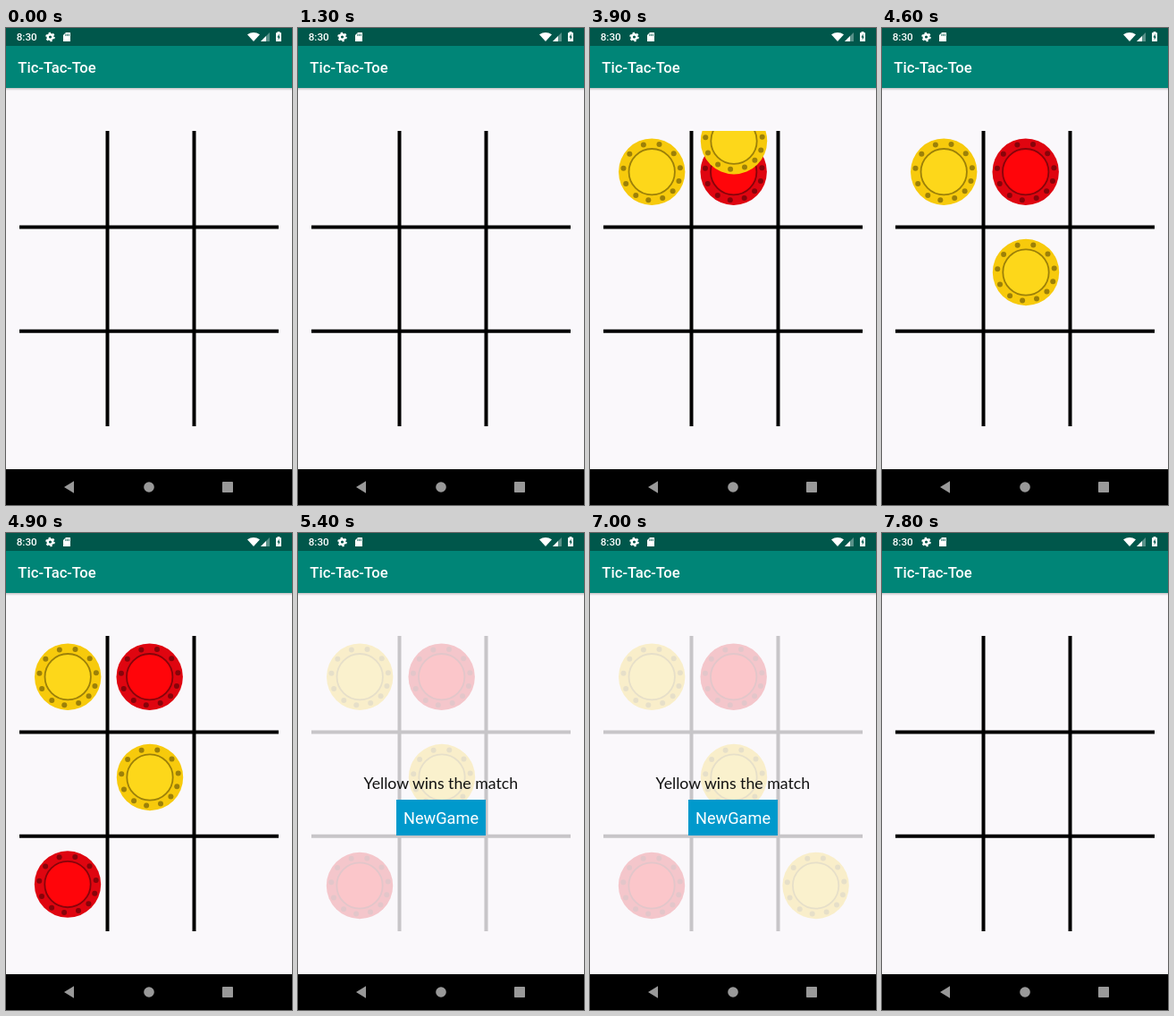
Animation, 320 px wide and 533 px high, one loop 8000 ms. Source, as an HTML page:

```html
<!DOCTYPE html>
<html>
<head>
<meta charset="utf-8">
<style>
  html, body { margin: 0; width: 100%; height: 100%; overflow: hidden; background: #faf8fb; }
  svg { display: block; width: 320px; height: 533px; }
  text { font-family: Roboto, sans-serif; fill: #fff; }
  .medium { font-weight: 500; }
</style>
</head>
<body>
<svg viewBox="0 0 320 533">
  <defs>
    <clipPath id="area"><rect x="15" y="115" width="290" height="330"/></clipPath>
    <linearGradient id="shade" x2="0" y2="1">
      <stop stop-opacity=".22"/><stop offset="1" stop-opacity="0"/>
    </linearGradient>
  </defs>
  <rect width="320" height="533" fill="#faf8fb"/>

  <g id="board" clip-path="url(#area)">
    <path d="M113.5 115V445M210.5 115V445M15 222.5H305M15 338.7H305" stroke="#000" stroke-width="4"/>
    <g id="discs"></g>
  </g>

  <g id="result">
    <text x="159.8" y="286" text-anchor="middle" style="font:17.7px Lato,sans-serif;fill:#111">Yellow wins the match</text>
    <rect x="110" y="298" width="100" height="40" fill="#0099cc"/>
    <text x="160" y="324.7" text-anchor="middle" font-size="18.2">NewGame</text>
  </g>

  <rect y="67" width="320" height="3" fill="url(#shade)"/>
  <rect y="20" width="320" height="47" fill="#008577"/>
  <rect width="320" height="20" fill="#00574b"/>
  <text class="medium" x="13.3" y="50" font-size="16.67">Tic-Tac-Toe</text>
  <text class="medium" x="11.7" y="14.3" font-size="11.7">8:30</text>

  <g fill="#fff">
    <circle cx="49.5" cy="10" r="2.8" fill="none" stroke="#fff" stroke-width="2.4"/>
    <circle cx="49.5" cy="10" r="4.5" fill="none" stroke="#fff" stroke-width="1.6" stroke-dasharray="2.3 2.41"/>
    <path d="M67 5H72V15H64V8Z"/>
    <path d="M66.8 6.5V9M68.6 6.5V9M70.4 6.5V9" stroke="#00574b" stroke-width=".8"/>
    <path d="M277 15L270 7.3Q277 2.7 284 7.3Z"/>
    <path d="M285 15L295 5V15Z" opacity=".35"/>
    <path d="M285 15L291 9V15Z"/>
    <path d="M302 5.2H303.6V4H306.4V5.2H308V15H302Z"/>
    <path d="M305.6 6.5L303.4 10.4H304.7V13.5L306.8 9.4H305.6Z" fill="#00574b"/>
  </g>

  <rect y="493" width="320" height="40"/>
  <g fill="#999">
    <path d="M65 513L76 506.3V519.7Z"/>
    <circle cx="160" cy="513" r="5.8"/>
    <rect x="242" y="507" width="12" height="12" rx=".8"/>
  </g>
</svg>
<script>
const LOOP = 8000, TICK = 100, FALL_TIME = 300, FALL = 444;
const WIN = 5400, RESET = 7800;
const yellow = { rim: '#f7ca0c', face: '#fdd71a', mark: '#9c8009' };
const red = { rim: '#df0510', face: '#ff050a', mark: '#87040a' };
const moves = [
  { color: yellow, x: 69.2, y: 160.7, start: 1890 },
  { color: red, x: 160.7, y: 160.7, start: 2890 },
  { color: yellow, x: 161, y: 273, start: 3717 },
  { color: red, x: 69, y: 394, start: 4611 },
  { color: yellow, x: 252.6, y: 394, start: 5378 },
];
const dotAngles = [-107, -75, -40, -8, 19, 43, 68, 97, 124, 155, 187, 219];
const get = id => document.getElementById(id);

function discMarkup({ rim, face, mark }) {
  const dots = dotAngles.map(a => {
    const r = a * Math.PI / 180;
    return `<circle cx="${32 * Math.cos(r)}" cy="${31.7 * Math.sin(r)}" r="3" fill="${mark}"/>`;
  }).join('');
  return `<g><circle r="37.2" fill="${rim}"/>${dots}
    <circle r="25.7" fill="${face}" stroke="${mark}" stroke-width="1.8"/></g>`;
}

get('discs').innerHTML = moves.map(m => discMarkup(m.color)).join('');
const discs = [...get('discs').children];

function draw(time) {
  let t = Math.floor(time / TICK) * TICK;
  if (t === WIN + TICK) t = WIN; // the screen stalls while the result opens
  const won = t >= WIN && t < RESET;
  get('board').setAttribute('opacity', won ? 0.2 : 1);
  get('result').setAttribute('visibility', won ? 'visible' : 'hidden');
  moves.forEach(({ x, y, start }, i) => {
    const p = Math.min(1, Math.max(0, (t - start) / FALL_TIME));
    const offset = -FALL * (1 + Math.cos(Math.PI * p)) / 2;
    discs[i].setAttribute('transform', `translate(${x} ${y + offset})`);
    discs[i].setAttribute('visibility', t >= start && t < RESET ? 'visible' : 'hidden');
  });
}

const begin = performance.now();
function frame() {
  draw((performance.now() - begin) % LOOP);
  requestAnimationFrame(frame);
}
frame();
</script>
</body>
</html>
```
